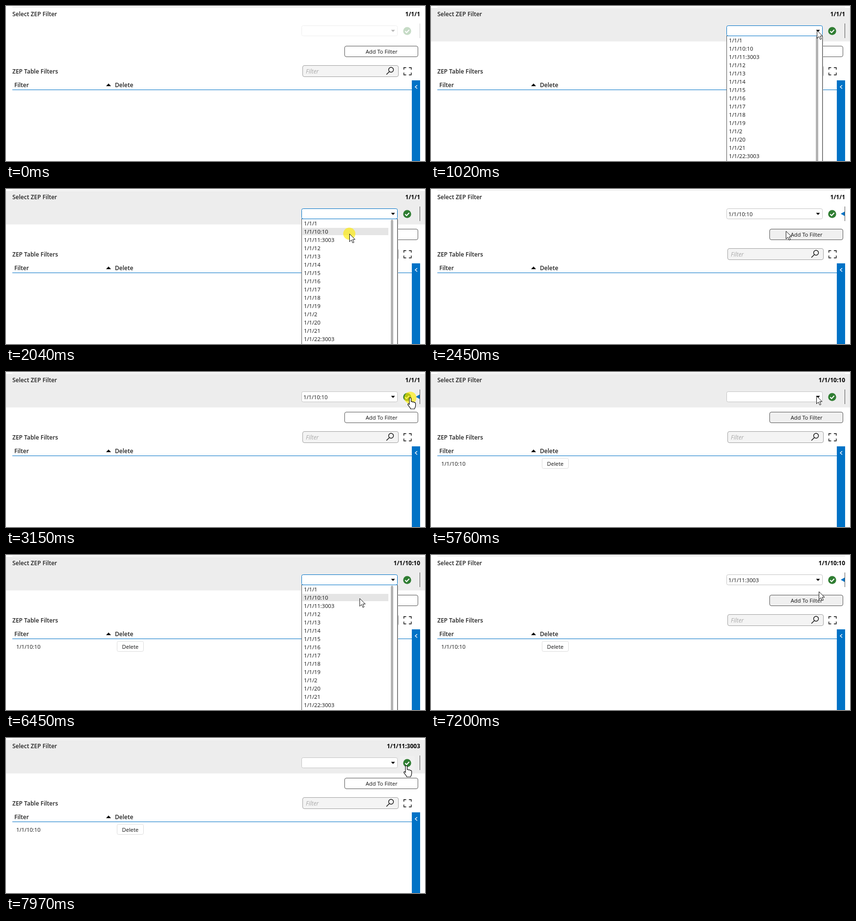
Recreate the animation shown at these times as an HTML page. Size 858 by 319 pixels, loop 8000 ms.

```html
<!DOCTYPE html>
<html lang="en">
<head>
<meta charset="utf-8">
<title>Table filter</title>
<style>
  html, body { margin: 0; width: 100%; height: 100%; overflow: hidden; background: #fff; }
  svg { display: block; width: 858px; height: 319px; }
  text { font: 11.2px "Open Sans", "Noto Sans", sans-serif; fill: #111; white-space: pre; }
  .bold { font-size: 12px; font-weight: 600; fill: #222; }
  .title { font-size: 12px; font-weight: 700; fill: #000; text-anchor: end; }
  .hint { font-size: 12px; font-style: italic; fill: #aaa; }
  .mid { text-anchor: middle; }
  .line { fill: none; stroke: #111; }
</style>
</head>
<body>
<svg viewBox="0 0 858 319">
  <path d="M13 2.5H848" stroke="#e3e3e3"/>
  <rect id="header" y="4" width="858" height="69" fill="#ededed"/>
  <text class="bold" x="13" y="21">Select ZEP Filter</text>
  <text id="title" class="title" x="848" y="21"></text>

  <rect id="checkBg" x="806" y="37" width="31" height="30" rx="3" fill="#f0f0f0"/>
  <g id="controls">
    <rect id="select" x="605.5" y="40.5" width="196" height="21" rx="3" fill="#fff"/>
    <path d="M788.5 49h8l-4 4.5z"/>
    <circle cx="821.5" cy="51.5" r="8.2" fill="#2f7d32"/>
    <path d="M817.3 51.8l3 3 5.4-5.8" fill="none" stroke="#fff" stroke-width="2"/>
    <path d="M847.5 36V66" stroke="#555"/>
  </g>
  <text id="value" x="609" y="55.5"></text>
  <path id="mark" d="M839 51l8-4.5v9z" fill="#0072c6"/>

  <rect id="add" x="693.5" y="82.5" width="150" height="22" rx="3.5" stroke="#555"/>
  <text class="mid" x="769" y="98">Add To Filter</text>

  <text class="bold" x="13" y="139">ZEP Table Filters</text>
  <rect x="607.5" y="122.5" width="196" height="23" rx="3.5" fill="#f4f4f4" stroke="#a0a0a0"/>
  <text class="hint" x="614" y="139">Filter</text>
  <g class="line" stroke-width="1.4">
    <circle cx="788.5" cy="131.3" r="5"/>
    <path d="M785 135l-6 6"/>
    <path d="M814.7 131v-4.3h4.8M825 126.700h4.800v4.300M829.800 137v4.800h-4.800M819.500 141.800h-4.800v-4.800"/>
  </g>

  <text class="bold" x="17" y="167">Filter</text>
  <path d="M205 165h10l-5-5.500z"/>
  <text class="bold" x="223" y="167">Delete</text>
  <path d="M13 172.500H831" stroke="#0072c6"/>
  <g id="row">
    <text x="21" y="193">1/1/10:10</text>
    <rect x="227.500" y="177.500" width="54" height="21" rx="3" fill="#fff" stroke="#dcdcdc"/>
    <text class="mid" x="254.500" y="193">Delete</text>
  </g>
  <rect x="831" y="153" width="17" height="166" fill="#0072c6"/>
  <path d="M842 163l-4 3.500 4 3.500" fill="none" stroke="#fff" stroke-width="1.400"/>

  <g id="list">
    <path d="M802.500 63V319" stroke="#bbb"/>
    <rect x="605.500" y="61.500" width="196" height="262" fill="#fff" stroke="#555"/>
    <path d="M606 61.500H801" stroke="#0072c6"/>
    <rect id="hover" x="607" width="176" height="15" fill="#e5e5e5"/>
    <g id="items"></g>
    <rect x="788" y="63" width="5" height="264" rx="2.500" fill="#b3b3b3"/>
  </g>

  <g id="pointer">
    <circle id="click" r="12.500" fill="#ffeb00" fill-opacity=".65"/>
    <path id="arrow" d="M.5.500v16l3.800-3.600 2.700 6 2.600-1.100-2.700-5.900h5.100z" fill="#fff" stroke="#111"/>
    <path id="hand" d="M-2 1.500c0-2.200 3.600-2.200 3.600 0v7c.6-1.200 3-1 3.300.5.800-1 2.800-.6 3 .9 1-.7 2.700 0 2.700 1.500v5c0 3-1.600 4.300-2 6.600h-8c-.8-3.300-4-5.600-5.600-8.600-.8-2 1.300-3 3-.7z" fill="#fff" stroke="#111" stroke-width="1.200"/>
  </g>
</svg>
<script>
const LOOP = 8000, STEP = 70;
const $ = id => document.getElementById(id);
const show = (id, on) => $(id).style.display = on ? "" : "none";
const within = (t, spans) => spans.some(([a, b]) => t >= a && t < b);

// Pointer stops: time, x, y
const path = [
  [120, 742, 240], [330, 775, 60], [470, 775, 60], [750, 790, 50],
  [1290, 790, 50], [1840, 703, 92], [2240, 703, 92], [2800, 836, 60],
  [2870, 836, 60], [3150, 828, 53], [3690, 828, 53], [3970, 797, 83],
  [5759, 797, 83], [5760, 789, 49], [6310, 789, 49], [6520, 701, 103],
  [7060, 701, 103], [7200, 794, 75], [7480, 820, 57], [LOOP, 820, 57]
];
const bursts = [0, 120, 470, 1290, 2040, 2870, 3690, 5760, 6310, 6920, 7760];
const clicks = [[820, 960], [2040, 2170], [3080, 3290], [4030, 4170], [5830, 5970], [6920, 7060], [7760, 7900]];
const opened = [[960, 2170], [5970, 7060]];
const titles = [[0, "1/1/1"], [3430, "1/1/10:10"], [7900, "1/1/11:3003"]];
const values = [[0, ""], [2170, "1/1/10:10"], [3430, ""], [7060, "1/1/11:3003"], [7900, ""]];
const names = ["1", "10:10", "11:3003", "12", "13", "14", "15", "16", "17", "18", "19", "2", "20", "21", "22:3003"];

$("items").innerHTML = names.map((n, i) => `<text x="610" y="${75 + 17 * i}">1/1/${n}</text>`).join("");

const at = (table, t) => table.filter(([start]) => start <= t).pop()[1];

function snap(t) {
  const start = bursts.filter(b => b <= t).pop();
  return start + Math.floor((t - start) / STEP) * STEP;
}

function position(t) {
  const i = path.findIndex(([end]) => end > t);
  if (i < 1) return path[i < 0 ? path.length - 1 : 0].slice(1);
  const [t0, x0, y0] = path[i - 1], [t1, x1, y1] = path[i];
  const p = (t - t0) / (t1 - t0), e = p * p * (3 - 2 * p);
  return [x0 + (x1 - x0) * e, y0 + (y1 - y0) * e];
}

function draw(t) {
  const s = snap(t), [x, y] = position(s), [px, py] = position(s - STEP);
  const open = within(t, opened), value = at(values, t);
  const overCheck = t >= 120 && x > 806 && y < 72;
  const overAdd = t >= 400 && !open && px > 693 && px < 844 && py > 81 && py < 106;
  const item = Math.floor((y - 62) / 17);

  show("header", t >= 260 && (open || y < 73));
  show("checkBg", overCheck);
  show("mark", value && !open);
  show("row", t >= 4240);
  show("list", open);
  show("hover", open && item >= 0);
  show("pointer", t >= 120);
  show("click", within(t, clicks));
  show("arrow", !overCheck);
  show("hand", overCheck);

  $("title").textContent = at(titles, t);
  $("value").textContent = open ? "" : value;
  $("controls").setAttribute("opacity", Math.min(1, Math.max(.27, .27 + (s - 120) / 210 * .73)));
  $("select").setAttribute("stroke", open ? "#0072c6" : "#c4c4c4");
  $("add").setAttribute("fill", overAdd ? "#f0f0f0" : "#fff");
  $("hover").setAttribute("y", 63 + 17 * item);
  $("pointer").setAttribute("transform", `translate(${x} ${y})`);
}

const begin = performance.now();
function tick() {
  draw((performance.now() - begin) % LOOP);
  requestAnimationFrame(tick);
}
tick();
</script>
</body>
</html>
```
